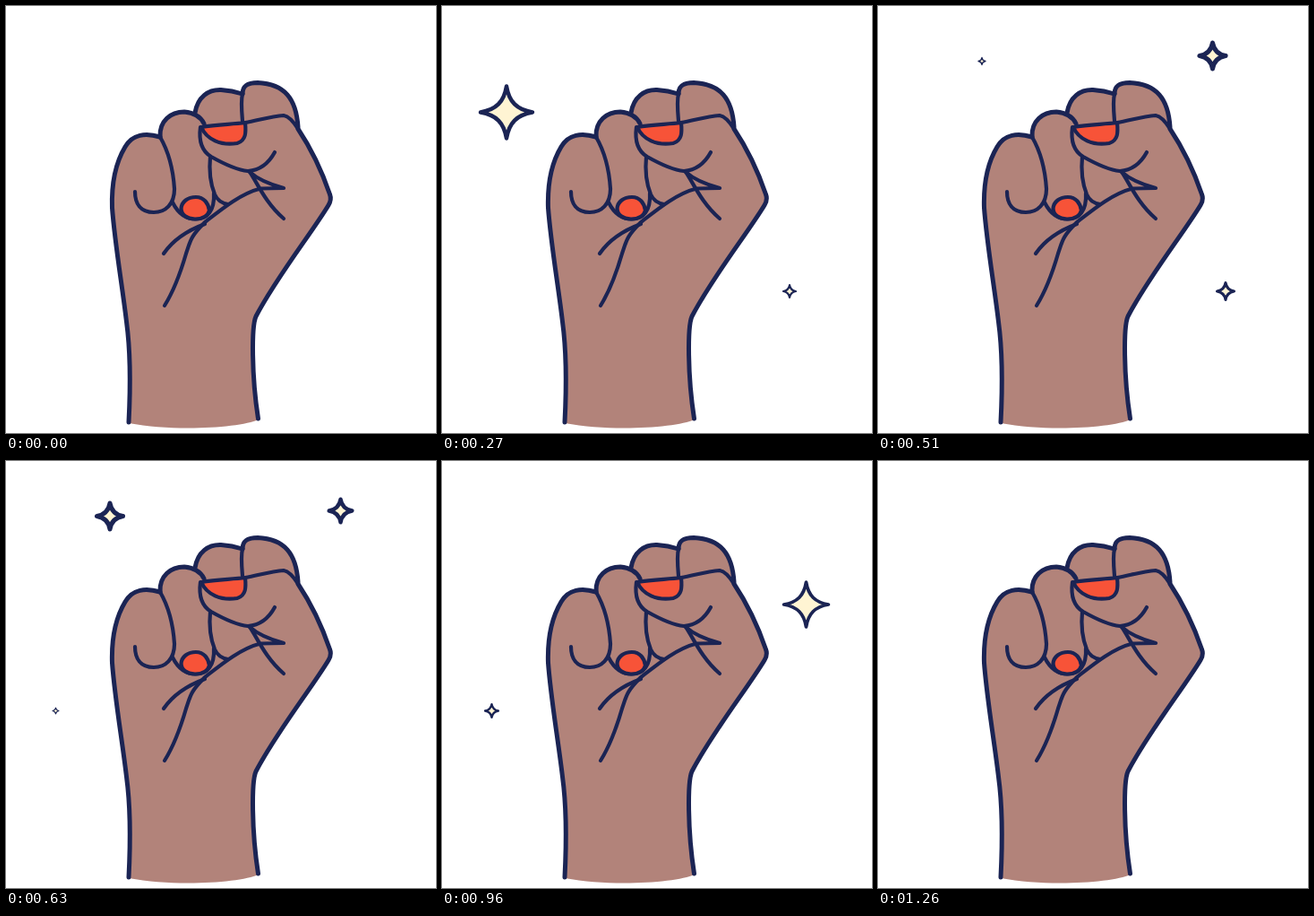
Animation of 480 by 476 pixels, one loop 1.29 s. Source, as an HTML page:

```html
<!DOCTYPE html>
<html lang="en">
<head>
<meta charset="utf-8">
<title>Raised fist</title>
<style>
  html, body { margin: 0; width: 100%; height: 100%; overflow: hidden; background: #fff; }
  svg { display: block; width: 100%; height: 100%; }
  .ink { fill: none; stroke: #1b2454; stroke-width: 4.2; stroke-linecap: round; stroke-linejoin: round; }
  .edge { stroke-width: 5; }
  .skin { fill: #b2837a; }
  .nail { fill: #f75338; }
  .star { fill: #fff4d3; stroke-width: 5; }
</style>
</head>
<body>
<svg viewBox="0 0 480 476">
  <path class="skin" d="M137 464C139 425 139 385 134.500 352C129.500 310 121.500 265 118.500 225C117.500 195 124 172 133 157C141 143 156 141 172 146C171 127 184 118 199 118C205 118 209 119 211 119C214 101 226 93 240 93.500C250 94 258 96 264 98C264 88 271 85.500 281 85.500C311 87 324 103 326 135C340 158 352 182 361.500 210C363 214 363 217 360 222C342 252 302 302 279 346C274 357 274 412 281.500 460L282 461C262 470 190 475 137 465Z"/>
  <g class="ink edge">
    <path d="M137 464C139 425 139 385 134.500 352C129.500 310 121.500 265 118.500 225C117.500 195 124 172 133 157C141 143 156 141 172 146"/>
    <path d="M172 146C171 128 184 118 199 118C210 119 217 123 221 131"/>
    <path d="M211 119C214 101 226 93 240 93.500C250 94 258 96 264 98"/>
    <path d="M264 98C264 88 271 85.500 281 85.500C311 87 324 103 326 135"/>
    <path d="M326 137C340 158 352 182 361.500 210C363 214 363 217 360 222C342 252 302 302 279 346C274 357 274 412 281.500 460"/>
  </g>
  <g class="ink">
    <!-- fingers -->
    <path d="M172 146C183 165 187 188 188 204C188 221 178 230 165 230C150 230 144 220 144 207"/>
    <path d="M264 98C262 106 263 116 264 128"/>
    <path d="M186 219C192 231 201 237.500 212 237.500C225 237 233 228 232 209"/>
    <path d="M228 168C226 188 229 200 233 210C236 217 241 220 248 221"/>
    <path class="nail" d="M195.500 226C196 218 203 213 212 213C221 213 226 220 227 228C225 235 219 237.500 211 237.500C202 237 196 233 195.500 226Z"/>
    <!-- thumb -->
    <path d="M217 135C215 150 219 162 229 168C245 177 259 183 270 184C285 183 294 174 300 163"/>
    <path d="M267 130C283 127 296 123 310 122C316 123 321 129 326 137"/>
    <path class="nail" d="M218 135C236 132 252 132 267 130C268 141 268 150 258 153C240 156 224 149 218 135Z"/>
    <!-- palm creases -->
    <path d="M272 185C282 194 295 199 310 203L284 203.500C262 209 240 227 222 241C205 258 206 262 201 276C194 300 187 318 177 334"/>
    <path d="M272 185C280 196 289 219 310 237"/>
    <path d="M176 276C187 260 203 250 222 243"/>
  </g>
  <g id="stars"></g>
</svg>
<script>
const LOOP = 1290;
// grow..full: opening, full..fade: held, fade..gone: closing
const stars = [
  { x: 72, y: 118.5, r: 32, grow: 0, full: 180, fade: 225, gone: 461 },
  { x: 388, y: 318, r: 15.4, grow: 178, full: 375, fade: 430, gone: 620 },
  { x: 373.5, y: 55.5, r: 14.6, grow: 297, full: 497, fade: 587, gone: 787 },
  { x: 116, y: 61.5, r: 14.6, grow: 445, full: 635, fade: 735, gone: 935 },
  { x: 55.5, y: 278.5, r: 15.2, grow: 568, full: 768, fade: 858, gone: 1058 },
  { x: 406.5, y: 160, r: 33.2, grow: 840, full: 1018, fade: 1085, gone: 1262 }
];

const smooth = (a, b, t) => {
  const k = Math.min(1, Math.max(0, (t - a) / (b - a)));
  return k * k * (3 - 2 * k);
};

function starPath(r) {
  const n = r * 0.1, f = r * 0.4;
  return `M0 ${-r}C${n} ${-f} ${f} ${-n} ${r} 0C${f} ${n} ${n} ${f} 0 ${r}` +
    `C${-n} ${f} ${-f} ${n} ${-r} 0C${-f} ${-n} ${-n} ${-f} 0 ${-r}Z`;
}

const layer = document.getElementById('stars');
for (const s of stars) {
  s.el = document.createElementNS(layer.namespaceURI, 'path');
  s.el.setAttribute('class', 'ink star');
  s.el.setAttribute('d', starPath(s.r));
  layer.append(s.el);
}

function draw(t) {
  for (const s of stars) {
    const size = smooth(s.grow, s.full, t) - smooth(s.fade, s.gone, t);
    s.el.setAttribute('transform', `translate(${s.x} ${s.y}) scale(${size})`);
    s.el.setAttribute('visibility', size > 0.02 ? 'visible' : 'hidden');
  }
}

const start = performance.now();
function tick() {
  const t = (performance.now() - start) % LOOP;
  draw(Math.floor(t / 30) * 30);
  requestAnimationFrame(tick);
}
draw(0);
requestAnimationFrame(tick);
</script>
</body>
</html>
```
